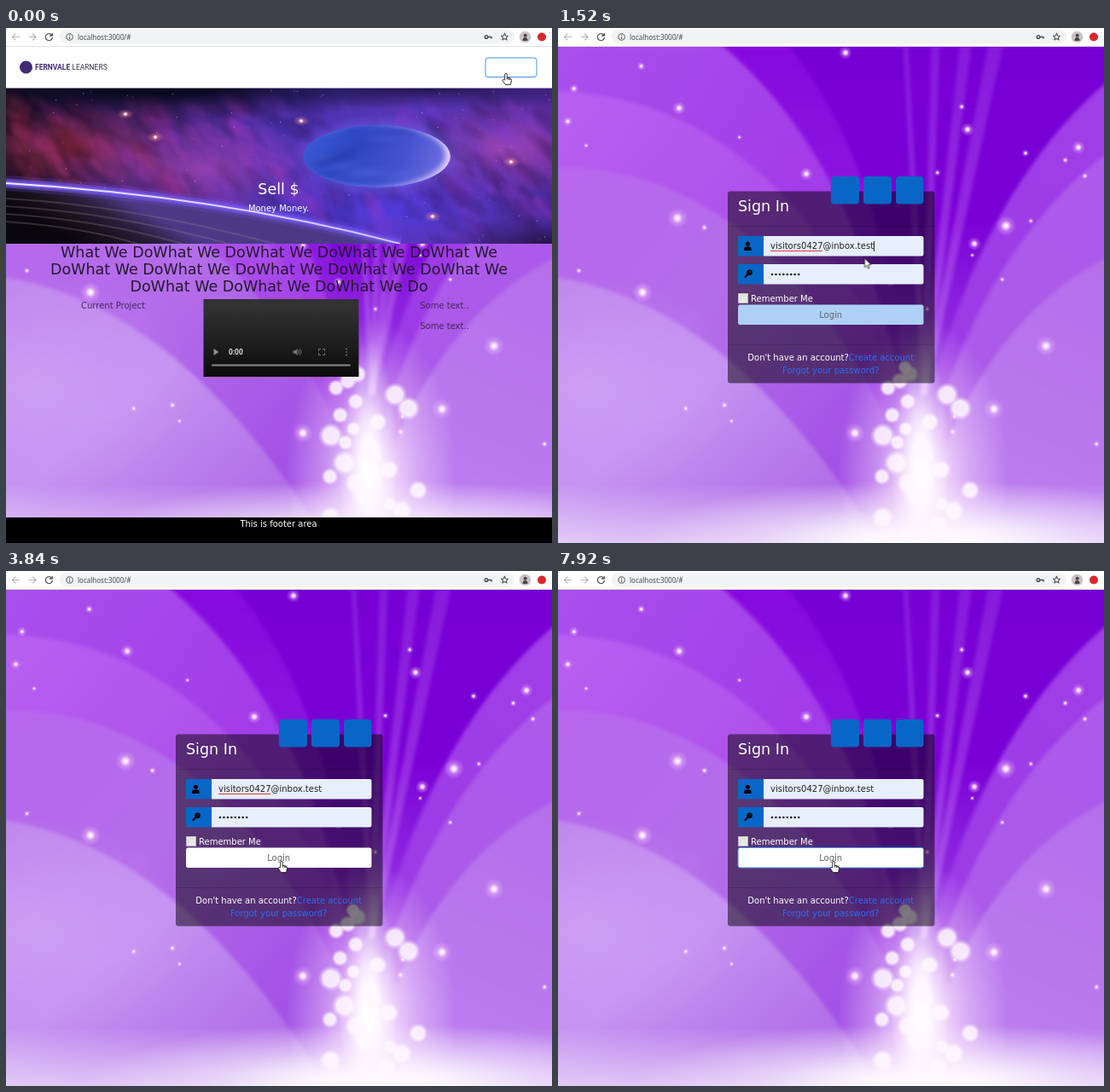
Recreate the animation shown at these times as an HTML page with a canvas. Size 640 by 604 pixels, loop 8000 ms.

```html
<!DOCTYPE html>
<html lang="en">
<head>
<meta charset="utf-8">
<title>Sign in</title>
<style>
  html, body { margin: 0; width: 100%; height: 100%; overflow: hidden; background: #fff; }
  #stage { position: relative; width: 640px; height: 604px; overflow: hidden; }
  #stage > *, #landing > * { position: absolute; left: 0; top: 0; display: block; }
  #landing { width: 640px; height: 604px; }
  #landing > #hero { top: 70px; }
  text { font: 10px "DejaVu Sans", sans-serif; }
  .big { font-size: 17.5px; }
  .mid { text-anchor: middle; }
  .ui { font: 8px "Noto Sans", sans-serif; }
  .brand { font: 8.5px Roboto, sans-serif; fill: #3c3350; }
  .brand .bold { font-weight: 700; fill: #432a76; }
  .clock { font: 500 8.5px Roboto, sans-serif; }
  .line { fill: none; stroke-linecap: round; stroke-linejoin: round; }
</style>
</head>
<body>
<div id="stage">
  <canvas id="backdrop" width="640" height="604"></canvas>

  <svg id="login" width="640" height="604">
    <rect x="199" y="191.5" width="242.5" height="225" rx="3" fill="#000" fill-opacity=".5"/>
    <path d="M199 232.5H441M199 371.500H441" stroke="#000" stroke-opacity=".13"/>
    <g fill="#0866c6">
      <rect x="320" y="174" width="33" height="32.5" rx="4"/>
      <rect x="358" y="174" width="33" height="32.5" rx="4"/>
      <rect x="396" y="174" width="32.5" height="32.5" rx="4"/>
    </g>
    <text class="big" x="211" y="215" fill="#fff">Sign In</text>

    <path d="M241 244H426q2.500 0 2.500 2.500v18.500q0 2.500-2.500 2.500H241zM241 277H426q2.500 0 2.500 2.500v18.500q0 2.500-2.500 2.500H241z" fill="#e6effb"/>
    <path d="M211 244h30v23.500h-30zM211 277h30v23.500h-30z" fill="#0866c6"/>
    <circle cx="222.300" cy="253.300" r="2.500"/>
    <path d="M218 261v-2q0-2.500 2.500-2.500h3.600q2.500 0 2.500 2.500v2z"/>
    <circle cx="224.600" cy="286.800" r="3.200"/>
    <path d="M223 288.500l-4 4" stroke="#000" stroke-width="2.300"/>
    <circle cx="225.500" cy="286" r=".8" fill="#0866c6"/>
    <text x="249" y="259" fill="#222">visitors0427@inbox.test</text>
    <path id="spelling" d="M249 261.500H310" stroke="#e2334a"/>
    <path id="caret" d="M370.500 250V262" stroke="#222"/>
    <path d="M251 289H284" stroke="#222" stroke-width="2.700" stroke-linecap="round" stroke-dasharray="0 4.450"/>

    <rect x="211.500" y="311.500" width="11" height="11" fill="#e9e9e9" stroke="#b8b8b8"/>
    <path d="M214 320V314H220" fill="none" stroke="#d2d2d2"/>
    <text x="226" y="320.500" fill="#fff">Remember Me</text>
    <rect id="button" x="211" y="324.500" width="217.500" height="23.500" rx="2.500" fill="#aed0f6"/>
    <rect id="ring" x="211" y="324.500" width="217.500" height="23.500" rx="2.500" fill="none" stroke="#4b8df0"/>
    <text class="mid" x="319.700" y="339.500" fill="#606468">Login</text>
    <text class="mid" x="319.700" y="389.500" fill="#fff">Don't have an account?<tspan fill="#2b6df2">Create account</tspan></text>
    <text class="mid" x="319.700" y="404.500" fill="#2b6df2">Forgot your password?</text>
  </svg>

  <div id="landing">
    <canvas id="hero" width="640" height="183"></canvas>
    <svg width="640" height="604">
      <defs>
        <linearGradient id="screen" x2="0" y2="1">
          <stop offset=".1" stop-color="#323232"/><stop offset="1" stop-color="#0b0b0b"/>
        </linearGradient>
      </defs>
      <path d="M0 22H640V70.500H0z" fill="#fff"/>
      <circle cx="23.500" cy="46" r="7.500" fill="#432a76"/>
      <text class="brand" x="34" y="49"><tspan class="bold">FERNVALE</tspan> LEARNERS</text>
      <rect x="562" y="35" width="60" height="22.500" rx="3" fill="#fff" stroke="#4b8fe0"/>

      <g class="mid" fill="#fff">
        <text class="big" x="319.500" y="195">Sell $</text>
        <text x="319.500" y="215">Money Money.</text>
      </g>
      <g class="mid" fill="#25182f">
        <text class="big" x="320" y="268.500">What We DoWhat We DoWhat We DoWhat We DoWhat We</text>
        <text class="big" x="320" y="288.500">DoWhat We DoWhat We DoWhat We DoWhat We DoWhat We</text>
        <text class="big" x="320" y="308.500">DoWhat We DoWhat We DoWhat We Do</text>
      </g>
      <g class="mid" fill="#432659">
        <text x="125.500" y="328.500">Current Project</text>
        <text x="514" y="328.500">Some text..</text>
        <text x="514" y="353">Some text..</text>
      </g>

      <rect x="231.500" y="318" width="182" height="91" fill="url(#screen)"/>
      <path d="M243.500 376V384L249.500 380z" fill="#8d8d8d"/>
      <text class="clock" x="261" y="383" fill="#fff">0:00</text>
      <path d="M336.500 378.500h2l3-2.500v8l-3-2.500h-2z" fill="#777"/>
      <path class="line" d="M343 378q1.500 2 0 4M344.500 376.500q3 3.500 0 7M366.500 378.500v-2h2M371.500 376.500h2v2M373.500 381.500v2h-2M368.500 383.500h-2v-2" stroke="#777"/>
      <path class="line" d="M399 376.500V384" stroke="#777" stroke-width="1.800" stroke-dasharray="0 3.500"/>
      <path class="line" d="M242 395.500H403" stroke="#8a8a8a" stroke-width="2"/>

      <path d="M0 574H640V604H0z"/>
      <text class="mid" x="319.500" y="584.500" fill="#fff">This is footer area</text>
    </svg>
  </div>

  <svg id="browser" width="640" height="604">
    <path d="M0 0H640V22H0z" fill="#fff"/>
    <path d="M0 21.500H640" stroke="#e2e2e5"/>
    <rect x="63" y="1.500" width="533" height="17" rx="8.500" fill="#f1f3f4"/>
    <g class="line" stroke-width="1.100">
      <path d="M15.500 10.500H8M11 7L7.500 10.500L11 14M27 10.500H34.500M31.500 7L35 10.500L31.500 14" stroke="#b4b6b9"/>
      <path d="M53.600 8.300A4 4 0 1 0 54.300 11.500M54.300 6.300V9H51.500" stroke="#55585c" stroke-width="1.300"/>
      <circle cx="74.500" cy="10.500" r="3.700" stroke="#5f6368"/>
      <path d="M74.500 10.300V12.500M74.500 8.500V8.600" stroke="#5f6368"/>
      <circle cx="563" cy="10.500" r="1.800" stroke="#4f5256" stroke-width="1.500"/>
      <path d="M565 10.500H569V12" stroke="#4f5256" stroke-width="1.500"/>
      <path d="M584.500 6.300L585.700 9L588.500 9.300L586.400 11.200L587 14L584.500 12.600L582 14L582.600 11.200L580.500 9.300L583.300 9z" stroke="#55585c"/>
    </g>
    <text class="ui" x="84" y="13.500" fill="#45484c">localhost:3000/#</text>
    <circle cx="608.500" cy="10.500" r="6.800" fill="#c9c4c3"/>
    <path d="M605.500 15q0-4 3-4t3 4z" fill="#4b4145"/><circle cx="608.700" cy="8.800" r="2" fill="#4b4145"/>
    <circle cx="628" cy="10.500" r="5" fill="#d8282c"/>

    <g id="cursor">
      <path id="arrow" d="M0 0V10.500L2.400 8.300L4 12L5.700 11.300L4.100 7.700H7.400z" fill="#fff" stroke="#222" stroke-width=".8"/>
      <path id="hand" d="M-1.300 1.200Q0-1 1.300 1.200V5.200L5 6Q6.700 6.500 6.500 8.500L5.500 13.500H-.5L-4 8.700Q-4 6.500-1.300 8zM1.300 5V7.500M3.300 5.700V8M5 6V8.200" fill="#fff" stroke="#222" stroke-width=".9" stroke-linejoin="round"/>
    </g>
  </svg>
</div>

<script>
const LOOP = 8000;
const $ = id => document.getElementById(id);

function seeded(seed) {
  return () => (seed = (seed * 16807) % 2147483647) / 2147483647;
}

function gradient(g, x0, y0, x1, y1, ...colors) {
  const fill = g.createLinearGradient(x0, y0, x1, y1);
  colors.forEach((c, i) => fill.addColorStop(i / (colors.length - 1), c));
  return fill;
}

// Soft ellipse; rgb is an "r,g,b" string, core the share at full strength.
function glow(g, x, y, rx, ry, rgb, alpha, core = 0, turn = 0) {
  g.save();
  g.translate(x, y);
  g.rotate(turn);
  g.scale(rx, ry);
  const fill = g.createRadialGradient(0, 0, 0, 0, 0, 1);
  fill.addColorStop(core, `rgba(${rgb},${alpha})`);
  fill.addColorStop((1 + core) / 2, `rgba(${rgb},${alpha * 0.4})`);
  fill.addColorStop(1, `rgba(${rgb},0)`);
  g.fillStyle = fill;
  g.fillRect(-1, -1, 2, 2);
  g.restore();
}

function sparkle(g, x, y, r) {
  glow(g, x, y, r, r, '250,205,255', 0.85);
  glow(g, x, y, r / 2, r / 2, '255,245,255', 0.9, 0.25);
}

function drawBackdrop(g) {
  const random = seeded(2024);
  const petal = (d, ...grad) => {
    g.fillStyle = gradient(g, ...grad);
    g.fill(new Path2D(d));
  };
  g.fillStyle = gradient(g, 0, 22, 300, 200, '#a950ec', '#a23be9');
  g.fillRect(0, 0, 640, 604);

  // Soft petal edges
  g.filter = 'blur(2px)';
  petal('M180 10C280 90 365 220 405 440H450L660 80V10z', 0, 22, 0, 420, '#860ade', '#9024e0');
  petal('M262 10C340 105 390 230 410 440H440C480 280 550 150 660 50V10z', 0, 22, 0, 420, '#7600d4', '#7a00d6', '#9a3ee6');
  for (let i = 0; i < 4; i++) {
    const x = 404 + i * 34;
    petal(`M${x} 10h${6 + i * 4}L432 430h-6z`, 0, 22, 0, 420, 'rgba(205,130,255,.2)', 'rgba(225,170,255,.35)');
  }

  petal('M660 50C555 130 475 270 436 440L430 620H660z', 640, 80, 440, 420, '#a03ee8', '#9c3ae6');
  petal('M660 135C565 200 490 310 446 450L430 620H660z', 640, 160, 480, 460, '#ad5aec', '#ab5ae8');
  petal('M660 262C570 300 500 380 455 490L430 620H660z', 640, 262, 520, 520, '#b46eeb', '#bb7cef');

  petal('M-20 75C150 68 320 180 408 460V620H-20z', 0, 75, 390, 400, '#b860f1', '#af52ec', '#a040e6');
  petal('M-20 165C140 150 300 260 398 490V620H-20z', 0, 165, 360, 470, '#b767ee', '#b46dea', '#a452e6');
  petal('M-20 290C130 305 270 420 385 620H-20z', 0, 290, 260, 604, '#c086ee', '#c593f1', '#b06ce8');
  g.filter = 'none';
  glow(g, 30, 420, 190, 130, '216,176,248', 0.5);

  // Light rising from the bottom edge
  g.fillStyle = gradient(g, 0, 535, 0, 604, 'rgba(255,255,255,0)', 'rgba(255,255,255,.55)');
  g.fillRect(0, 535, 640, 69);
  glow(g, 430, 604, 340, 75, '255,255,255', 1, 0.15);
  glow(g, 428, 530, 100, 190, '255,240,255', 0.95, 0.1);
  glow(g, 425, 510, 34, 145, '255,255,255', 0.9, 0.2);

  for (let i = 0; i < 24; i++) {
    const y = 398 + i * 8;
    const r = 9 + random() * 6;
    glow(g, 428 + (random() - 0.5) * (80 + i * 2), y, r, r, '255,248,255', 0.85, 0.6);
  }

  const bright = [[140, 223], [99, 310], [525, 232], [572, 373], [511, 447], [348, 475],
    [142, 94], [291, 171], [480, 119], [337, 29], [610, 140], [488, 253]];
  bright.forEach(([x, y], i) => sparkle(g, x, y, i < 6 ? 12 : 8));
  for (let i = 0; i < 24; i++) sparkle(g, random() * 640, 40 + random() * 450, 3 + random() * 3);
}

function drawHero(g) {
  const random = seeded(77);
  g.translate(0, -70);
  g.fillStyle = gradient(g, 0, 130, 640, 190, '#180d22', '#41216c', '#4a32ae', '#5a35b4', '#4c2792');
  g.fillRect(0, 70, 640, 183);

  glow(g, 70, 140, 140, 50, '165,50,70', 0.7);
  glow(g, 230, 165, 150, 60, '165,70,180', 0.8);
  glow(g, 590, 140, 110, 60, '180,75,185', 0.8);
  glow(g, 450, 215, 190, 55, '80,60,225', 0.85);

  // Slanted clouds: red on the left turning violet and blue on the right
  for (let i = 0; i < 420; i++) {
    const x = random() * 640;
    const r = 3 + random() * 14;
    const hue = 345 - Math.min(1, x / 380) * 80 + (random() - 0.5) * 60;
    g.save();
    g.filter = 'blur(2px)';
    g.globalAlpha = 0.13;
    g.fillStyle = `hsl(${hue} 65% ${i % 3 ? 55 : 10}%)`;
    g.beginPath();
    g.ellipse(x, 85 + random() * 168, r * 1.7, r * 0.6, 0.5 + random() * 0.6, 0, 7);
    g.fill();
    g.restore();
  }
  glow(g, 180, 70, 340, 38, '6,8,28', 0.95, 0.2);
  glow(g, 500, 70, 220, 26, '10,8,36', 0.7);
  glow(g, 640, 253, 130, 36, '20,10,40', 0.7);

  for (let i = 0; i < 170; i++) {
    g.fillStyle = `rgba(245,220,255,${random() * 0.7})`;
    g.fillRect(random() * 640, 72 + random() * 178, 1, 1);
  }
  for (const [x, y] of [[140, 101], [346, 109], [175, 128], [592, 157], [500, 221]]) {
    glow(g, x, y, 10, 6, '255,140,150', 0.8);
    glow(g, x, y, 3, 3, '255,255,255', 1, 0.2);
  }

  // Planet: a bright disc mostly covered by a shifted darker one
  const disc = (x, y, fill) => {
    g.fillStyle = fill;
    g.beginPath();
    g.ellipse(x, y, 86, 36.5, 0, 0, 7);
    g.fill();
  };
  glow(g, 440, 150, 106, 50, '120,105,255', 0.7, 0.6);
  g.save();
  g.beginPath();
  g.ellipse(435, 150.5, 86, 36.5, 0, 0, 7);
  g.clip();
  disc(435, 150.5, gradient(g, 350, 0, 520, 0, '#5578ea', '#6a78e8', '#e4d0ff'));
  g.filter = 'blur(3px)';
  disc(429, 149, gradient(g, 350, 120, 520, 180, '#3a5ad8', '#2f47c2', '#4552d0', '#7774e0'));
  for (let i = 0; i < 14; i++)
    glow(g, 360 + random() * 140, 122 + random() * 55, 30, 5, i % 2 ? '110,135,240' : '30,42,150', 0.4, 0, -0.15);
  g.restore();

  // Horizon
  g.fillStyle = gradient(g, 120, 190, 85, 253, '#4a3a86', '#2a2140', '#17121c', '#0a070c');
  g.fill(new Path2D('M0 182Q250 197 462 253H0z'));
  for (let i = 0; i < 4; i++) {
    g.lineWidth = 2;
    g.strokeStyle = 'rgba(150,125,135,.3)';
    g.stroke(new Path2D(`M0 ${200 + i * 9}Q${150 - i * 15} ${208 + i * 9} ${330 - i * 55} 257`));
  }
  const edge = new Path2D('M0 182Q250 197 462 253');
  for (const width of [18, 11, 6, 2]) {
    const rgb = width > 2 ? '125,95,255' : '255,255,255';
    g.lineWidth = width;
    g.strokeStyle = gradient(g, 0, 0, 470, 0, `rgba(${rgb},${1 - width / 22})`, `rgba(${rgb},${0.7 - width / 30})`);
    g.stroke(edge);
  }
}

// steps: [ms, value]; the last value stays to the end of the loop.
function play(id, prop, steps, easing = 'linear') {
  const frames = steps.map(([ms, value]) => ({ offset: ms / LOOP, [prop]: value, easing }));
  frames.push({ offset: 1, [prop]: steps.at(-1)[1] });
  $(id).animate(frames, { duration: LOOP, iterations: Infinity });
}

// Visible or not from the start, flipping at each of the given times.
function toggle(id, shown, ...times) {
  play(id, 'opacity', [0, ...times].map((ms, i) => [ms, (i % 2) ^ shown]), 'steps(1, end)');
}

drawBackdrop($('backdrop').getContext('2d'));
drawHero($('hero').getContext('2d'));

const OPEN = 240, FOCUS = 1040, RELOAD = 4320, BLINK = 500;
const at = (ms, x, y) => [ms, `translate(${x}px, ${y}px)`];

play('cursor', 'transform', [at(0, 586, 53), at(OPEN, 586, 53), at(800, 383, 224),
  at(FOCUS, 373, 254), at(2080, 342, 291), at(3120, 322, 347), at(3360, 323, 340)], 'ease-in-out');
toggle('landing', 1, OPEN);
toggle('login', 0, OPEN);
toggle('hand', 1, OPEN, 3040);
toggle('arrow', 0, OPEN, 3040);
toggle('spelling', 0, FOCUS, RELOAD);
toggle('caret', 0, ...Array.from({ length: 7 }, (_, i) => FOCUS + i * BLINK), RELOAD);
play('button', 'fill', [[0, '#aed0f6'], [3200, '#aed0f6'], [3360, '#ffffff']]);
play('ring', 'opacity', [[0, 0], [4600, 0], [4760, 1]]);
</script>
</body>
</html>
```
